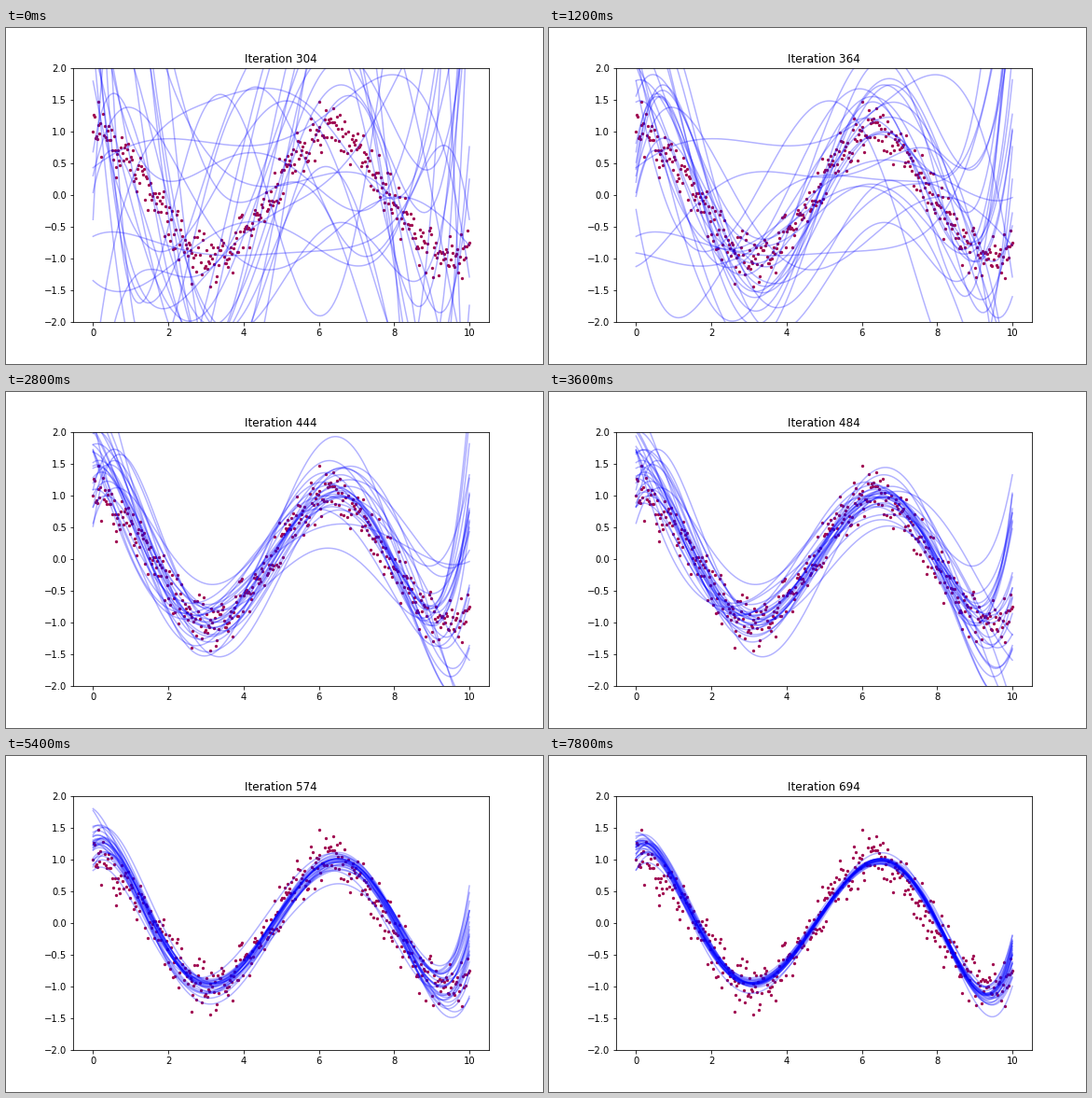
A matplotlib script for the animation above (8000 ms loop, 576 by 360 pixels).

```python
import numpy as np
import matplotlib.pyplot as plt
from matplotlib.animation import FuncAnimation

FRAMES, STEP_MS, CURVES = 40, 200, 26
rng = np.random.default_rng(11)

# Noisy cosine samples plus a few far outliers
x = np.linspace(0, 10, 400)
y = np.cos(x) + np.clip(rng.normal(0, 0.2, x.size), -0.38, 0.38)
x = np.append(x, [0.15, 0.62, 2.62, 3.12, 6.0])
y = np.append(y, [1.48, 0.28, -1.4, -1.44, 1.48])

# A quintic is stored as its values at six equally spaced nodes
NODES = np.arange(0, 11, 2)
xs = np.linspace(0, 10, 160)
BASIS = np.array([np.prod([(xs - b) / (a - b) for b in NODES if b != a], axis=0)
                  for a in NODES])

# Shape the population settles on
FIT_X = [0, 1.5, 3, 4.75, 6.45, 8.08, 9.3, 10]
FIT_Y = [1.08, 0.1, -0.95, 0, 0.95, 0, -1.15, -0.5]
best = np.polyval(np.polyfit(FIT_X, FIT_Y, 5), NODES)

# Long-lived early curves
EARLY = [[-0.65, -0.8, -0.95, -0.88, -0.4, 4],
         [3.8, 0.22, 0.66, 0.1, 0.3, 9],
         [8, 1.9, 0.2, 0.3, -0.1, -5]]


def newborn(k):
    """Best curve plus a deviation that shrinks as the run goes on."""
    scale = (0.85 * np.exp(-k / 11.6) + 0.02) * rng.uniform(0.4, 1.4)
    return best + scale * rng.normal([1.5, 0, 0, 0, 0, 1], [2.5, 1, 1, 1, 1, 5])


def evolve():
    """Swap the worst curves for new ones at every step."""
    pop = np.array(EARLY + [newborn(-8) for _ in range(CURVES - len(EARLY))])
    steps = [pop.copy()]
    for k in range(1, FRAMES):
        error = np.mean(np.abs((pop - best) @ BASIS), axis=1)
        for i in np.argsort(error)[-3:]:
            pop[i] = newborn(k)
        steps.append(pop.copy())
    return steps


history = evolve()

fig, ax = plt.subplots(figsize=(8, 5), dpi=72)
fig.subplots_adjust(left=0.125, right=0.9, bottom=0.125, top=0.88)
ax.scatter(x, y, s=11, color="#a00a50", linewidths=0, zorder=1)
lines = [ax.plot([], [], color="blue", alpha=0.3, lw=1.5)[0] for _ in range(CURVES)]
ax.set_xlim(-0.53, 10.53)
ax.set_ylim(-2, 2)
title = ax.set_title("Iteration 304")


def draw(k):
    for line, curve in zip(lines, history[k] @ BASIS):
        line.set_data(xs, curve)
    title.set_text(f"Iteration {304 + 10 * k}")
    return [*lines, title]


anim = FuncAnimation(fig, draw, frames=FRAMES, interval=STEP_MS, repeat=True,
                     repeat_delay=0, blit=False)
plt.show()
```
